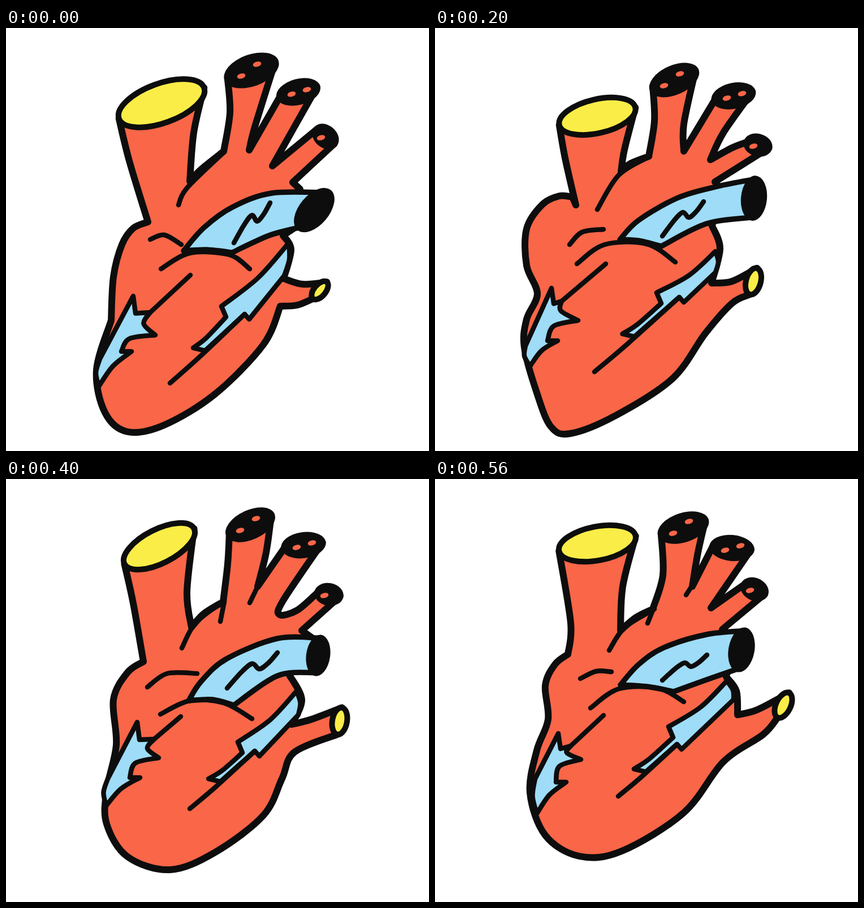
These frames come from a looping animation (748 by 748 pixels, 0.6 s). An HTML page:

```html
<!DOCTYPE html>
<html lang="en">
<head>
<meta charset="utf-8">
<title>Beating heart</title>
<style>
  html, body { margin: 0; width: 100%; height: 100%; overflow: hidden; background: #fff; }
  svg { display: block; width: 748px; height: 748px; }
  g { stroke: #0d0d0d; stroke-linecap: round; stroke-linejoin: round; }
  .body { fill: #fa6648; stroke-width: 12; }
  .vein { fill: #9edcf7; stroke-width: 8.5; }
  .vessel { fill: #9edcf7; stroke-width: 9.5; }
  .line { fill: none; stroke-width: 8.5; }
  .rim { fill: #fbed47; stroke-width: 10; }
  .cap { fill: #0d0d0d; stroke: none; }
  .hole { fill: #fa6648; stroke: none; }
</style>
</head>
<body>
<svg id="stage" viewBox="0 0 748 748"></svg>
<script>
// Tube ends: half width, half height and the offsets of the holes.
const tubes = {
  A: { rx: 69, ry: 30, rim: true },
  B: { rx: 47, ry: 26, holes: [[10, -11], [-18, 10]] },
  C: { rx: 40, ry: 23, holes: [[-12, 4], [15, -4]] },
  D: { rx: 26, ry: 20, holes: [[-8, 2]] },
  E: { rx: 24, ry: 13, rim: true },
  F: { rx: 40, ry: 23 }
};

// Key points "x,y"; "!" is a sharp corner, a letter is both ends of that tube's opening.
// tips: "x,y,angle,scale" for A to F
// left: bottom, lower tooth, upper tooth, fork, peak, top, crack end
// right: top, side, step, tooth, crack end
const poses = [
  {
    at: 0,
    tips: '275,133,-20,1.16 434,75,-20,1.08 517,113,-15 565,192,40 555,464,130,.8 545,322,130,1.15',
    body: '251,343! 218,235 A 332,185 325,271! 345,250 385,218! 396,150 B 440,175 430,216! C 471,244! D 507,273! 520,285! 515,350! 490,367! 504,392 491,443! 525,453 E 515,490 485,492! 455,560 370,647 280,702 215,714 175,680 160,605 186,517! 190,440 205,383 225,354',
    vessel: '314,394! 350,353 400,317 470,292 F 465,367 400,397! 355,392',
    lines: ['274,426 325,398 395,401 431,426', '255,374 280,366 310,383', '305,313 320,283 385,220'],
    squiggle: '403,380 467,309',
    left: '164,634 222,572 264,543 255,503 225,474 166,585 326,437',
    right: '500,380 492,438 430,515 381,492 290,628'
  },
  {
    at: 200,
    tips: '287,156,-13 423,92,-24 528,120,-12 571,207,15 563,448,105 564,301,95',
    body: '243,299! 249,313! 230,230 A 335,215 329,254! 345,240 378,227! 388,165 B 440,170 440,218! C 510,185 487,233! 525,212 D 495,272! 505,285! 490,350! 504,390 489,451! 525,448 E 525,487 478,540 420,620 320,685 240,717 205,705 180,645 158,565 162,515 181,470 162,420 162,355 190,312 220,297',
    vessel: '327,374! 360,340 430,300 500,280 F 480,346 400,386! 360,376',
    lines: ['251,417 300,383 375,382 425,414', '238,383 260,361 298,356', '287,321 325,260 380,227'],
    squiggle: '402,368 475,307',
    left: '168,598 217,553 253,517 224,483 206,460 160,562 302,417',
    right: '496,395 496,432 440,485 392,468 282,608'
  },
  {
    at: 300,
    tips: '297,166,-27 417,86,-15 518,114,8 569,208,70 580,436,98 555,309,108',
    body: '249,302! 251,260 A 342,233! 385,200 395,160 B 448,140 443,195! C 500,200 462,233! 510,222 D 510,260 491,278! 500,290! 490,360! 502,395 502,440! 535,433 E 515,495 480,565 405,645 300,705 235,708 205,680 178,608 158,545 193,465 199,435 193,380 215,327 259,302!',
    vessel: '322,385! 355,343 400,310 475,284 F 490,356 405,402! 365,388',
    lines: ['242,432 298,396 375,395 419,425', '253,375 275,359 313,359', '282,305 320,257 385,203', '443,188 432,211'],
    squiggle: '404,380 474,321',
    left: '175,607 229,553 265,504 252,478 218,465 160,570 295,427',
    right: '497,397 500,437 450,485 411,458 305,576'
  },
  {
    at: 400,
    tips: '271,119,-27 432,81,-25 526,117,-8 571,204,10 590,428,100 552,312,98,.92',
    body: '243,323! 225,220 A 320,200 328,262! 350,238 384,217! 392,150 B 460,130 445,190! C 490,215 484,240 515,232 D 523,268! 540,280! 500,345! 523,390 505,434! 540,425 E 510,483 488,530 455,595 370,660 290,691 215,668 178,610 178,550 195,470 190,390 215,342',
    vessel: '323,392! 345,358 390,318 480,282 F 480,348 403,400! 365,390',
    lines: ['273,416 325,392 385,396 435,424', '250,368 285,344 338,344', '311,299 335,255 385,216', '386,217 379,252', '445,190 431,219'],
    squiggle: '391,370 480,307',
    left: '177,578 237,528 270,493 262,460 232,430 180,530 309,420',
    right: '514,375 517,417 448,490 410,465 325,583'
  },
  {
    at: 500,
    tips: '287,114,-11 439,86,-18 525,122,5 565,195,25 616,400,115 542,302,100',
    body: '235,310! 240,255 A 332,190 328,268! 355,245 385,230! 403,170 B 465,130 455,190! C 488,228! D 508,266! 530,280! 515,350! 533,375 535,417! 570,408 E 580,452 510,500 440,590 330,658 255,667 195,630 168,555 180,480 200,425 195,365 212,328',
    vessel: '328,364! 360,328 405,298 480,275 F 480,355 422,376! 375,367',
    lines: ['275,405 325,371 395,370 440,394', '257,353 285,340 312,341', '308,303 335,263 388,230', '388,225 376,255', '455,188 444,205'],
    squiggle: '402,356 481,311',
    left: '180,592 232,536 258,496 240,472 218,450 177,530 298,418',
    right: '516,357 528,390 436,478 413,438 324,561'
  }
];

const LOOP = 600;
const stage = document.getElementById('stage');

function add(parent, tag, attrs = {}) {
  const el = document.createElementNS(stage.namespaceURI, tag);
  for (const key in attrs) el.setAttribute(key, attrs[key]);
  return parent.appendChild(el);
}

const corner = (x, y) => ({ x, y, sharp: true });
const near = (p, dx, dy) => corner(p.x + dx, p.y + dy);
const mix = (a, b, k, dx = 0, dy = 0) => ({ x: a.x + (b.x - a.x) * k + dx, y: a.y + (b.y - a.y) * k + dy });

function readTips(text) {
  const tips = {};
  text.split(' ').forEach((item, i) => {
    const name = 'ABCDEF'[i], tube = tubes[name];
    const [x, y, angle, scale = 1] = item.split(',').map(Number);
    tips[name] = { ...tube, x, y, angle, rx: tube.rx * scale, ry: tube.ry * scale };
  });
  return tips;
}

function tipEnds({ x, y, rx, angle, rim }) {
  const r = rim ? rx : rx - 6, a = angle * Math.PI / 180;
  return [-r, r].map(d => corner(x + d * Math.cos(a), y + d * Math.sin(a)));
}

function points(text, tips) {
  return text.split(' ').flatMap(s => {
    if (tips && tips[s]) return tipEnds(tips[s]);
    const [x, y] = s.replace('!', '').split(',').map(Number);
    return { x, y, sharp: s.endsWith('!') };
  });
}

// Smooth curve through the points, broken at corners.
function curve(pts, closed) {
  const n = pts.length;
  const at = i => closed ? pts[(i + n) % n] : pts[Math.max(0, Math.min(n - 1, i))];
  let d = `M${pts[0].x} ${pts[0].y}`;
  for (let i = 0; i < (closed ? n : n - 1); i++) {
    const a = at(i), b = at(i + 1);
    const c = mix(a, b, 0), e = mix(a, b, 1);
    const before = a.sharp ? a : at(i - 1);
    const after = b.sharp ? b : at(i + 2);
    c.x += (b.x - before.x) / 6; c.y += (b.y - before.y) / 6;
    e.x -= (after.x - a.x) / 6; e.y -= (after.y - a.y) / 6;
    d += `C${c.x} ${c.y} ${e.x} ${e.y} ${b.x} ${b.y}`;
  }
  return d + (closed ? 'Z' : '');
}

function leftVein(text) {
  const [bottom, low, high, fork, peak, top, end] = points(text).map(p => near(p, 0, 0));
  const notch = near(low, -18, 0);
  const valley = corner(peak.x + 4, (peak.y + fork.y) / 2 + 16);
  return {
    shape: [bottom, mix(bottom, low, .5, -4, -5), low, notch, mix(notch, high, .5, -16, -8), high,
      mix(high, fork, .5, -16), fork, valley, peak, top, mix(top, bottom, .5, -6)],
    crack: [fork, end]
  };
}

function rightVein(text) {
  const [top, side, step, tooth, end] = points(text).map(p => near(p, 0, 0));
  const back = near(step, -8, -9);
  const joint = near(mix(back, end, .53), 0, 0);
  const tip = near(joint, -21, -5), inner = near(tooth, 8, 19);
  return {
    shape: [top, mix(top, side, .5, 5), side, step, back, joint, tip,
      mix(tip, inner, .4, 0, 4), inner, tooth, mix(tooth, top, .5, 5, 6)],
    crack: [back, mix(back, end, .6, 0, 2), end]
  };
}

function squiggle(text) {
  const [a, b] = points(text);
  const bends = [[0, 0], [.29, .46], [.5, .69], [.64, .54], [.82, .71], [1, 1]];
  return bends.map(([u, v]) => ({ x: a.x + (b.x - a.x) * u, y: a.y + (b.y - a.y) * v }));
}

function draw(pose) {
  const g = add(stage, 'g');
  const tips = readTips(pose.tips);
  const shape = (cls, pts) => add(g, 'path', { class: cls, d: curve(pts, true) });
  const line = pts => add(g, 'path', { class: 'line', d: curve(pts, false) });
  const oval = (cls, cx, cy, rx, ry, angle) =>
    add(g, 'ellipse', { class: cls, cx, cy, rx, ry, transform: `rotate(${angle} ${cx} ${cy})` });

  shape('body', points(pose.body, tips));
  for (const vein of [leftVein(pose.left), rightVein(pose.right)]) {
    shape('vein', vein.shape);
    line(vein.crack);
  }
  shape('vessel', points(pose.vessel, tips));
  pose.lines.forEach(l => line(points(l)));
  line(squiggle(pose.squiggle));
  for (const { x, y, rx, ry, angle, rim, holes = [] } of Object.values(tips)) {
    oval(rim ? 'rim' : 'cap', x, y, rx, ry, angle);
    holes.forEach(([dx, dy]) => oval('hole', x + dx, y + dy, 7.5, 4.5, -15));
  }
  return g;
}

// Each pose is held until the next one starts.
for (const pose of poses) {
  const steps = poses.map(p => ({
    offset: p.at / LOOP, opacity: p === pose ? 1 : 0, easing: 'steps(1, end)'
  }));
  steps.push({ offset: 1, opacity: pose === poses[0] ? 1 : 0 });
  draw(pose).animate(steps, { duration: LOOP, iterations: Infinity });
}
</script>
</body>
</html>
```
